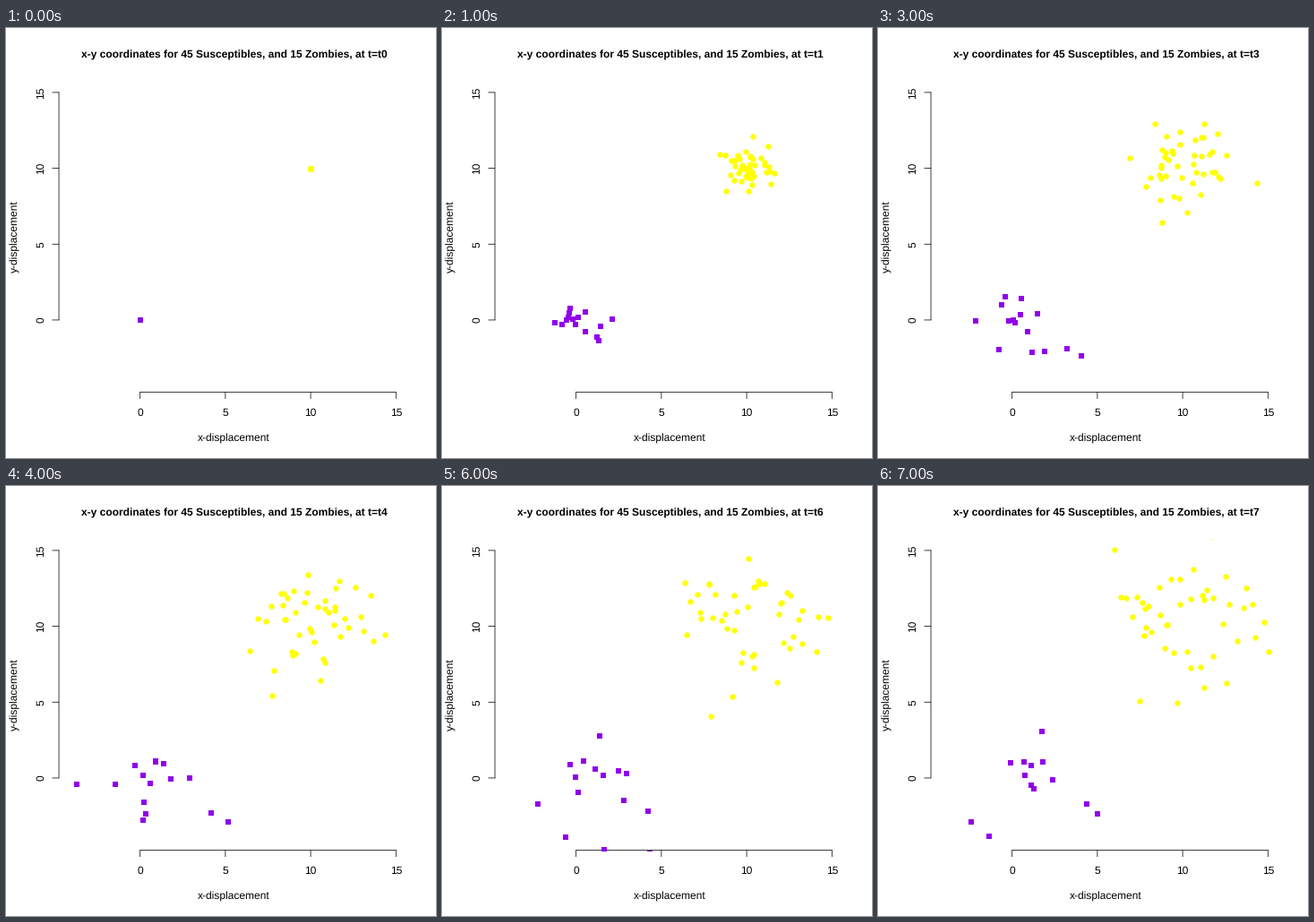
These frames come from a looping animation (480x480 px, 8000 ms). A matplotlib script:

```python
import numpy as np
import matplotlib.pyplot as plt
from matplotlib.animation import FuncAnimation
from matplotlib.patches import Rectangle

plt.rcParams["text.hinting"] = "no_hinting"

SIZE, DPI = 480, 80
PT = 72 / DPI                      # points per pixel
LEFT, RIGHT, TOP, BOTTOM = 59.04, 449.76, 59.04, 406.56
UNIT = np.array([(RIGHT - LEFT) / 20.52, (TOP - BOTTOM) / 20.52])
ORIGIN = np.array([LEFT, BOTTOM]) + 4.76 * UNIT
STEPS = 8

rng = np.random.default_rng(7)


def to_px(x, y):
    return ORIGIN + UNIT * (x, y)


def random_walk(count, start, drift, spread):
    """Gaussian walks from one start; the group's mean moves by drift."""
    moves = rng.normal(size=(STEPS, count, 2)) * spread
    moves += drift - moves.mean(axis=1, keepdims=True)
    moves[0] = start
    return ORIGIN + UNIT * moves.cumsum(axis=0)


fig = plt.figure(figsize=(SIZE / DPI, SIZE / DPI), dpi=DPI, facecolor="white")
ax = fig.add_axes([0, 0, 1, 1])
ax.set_xlim(0, SIZE)
ax.set_ylim(SIZE, 0)
ax.axis("off")


def label(x, y, text, **style):
    return ax.text(x, y, text, family="Liberation Sans", size=12 * PT,
                   ha="center", va="baseline", rotation_mode="anchor", **style)


def line(xs, ys):
    ax.plot(xs, ys, color="black", lw=0.75 * PT, solid_capstyle="round",
            snap=False)


def dots(marker, size, color):
    pts, = ax.plot([], [], ls="", marker=marker, ms=size * PT,
                   color=color, mew=0)
    pts.set_clip_path(Rectangle((LEFT, TOP), RIGHT - LEFT, BOTTOM - TOP,
                                transform=ax.transData))
    return pts


for v in (0, 5, 10, 15):
    x, y = to_px(v, v)
    line([x, x], [BOTTOM, BOTTOM + 7.2])
    line([LEFT, LEFT - 7.2], [y, y])
    label(x, 433, str(v))
    label(42, y, str(v), rotation=90)
(x0, y0), (x1, y1) = to_px(0, 0), to_px(15, 15)
line([x0, x1], [BOTTOM, BOTTOM])
line([LEFT, LEFT], [y0, y1])

mid_x, mid_y = (LEFT + RIGHT) / 2, (TOP + BOTTOM) / 2
label(mid_x, 462, "x-displacement")
label(13.7, mid_y, "y-displacement", rotation=90)
title = label(mid_x, 34, "", weight="bold")

groups = [
    (dots("o", 6.4, "#ffff00"),
     random_walk(45, (10, 10), drift=(0.04, 0.07), spread=(0.85, 0.85))),
    (dots("s", 5.6, "#9000ea"),
     random_walk(15, (0, 0), drift=(0.22, -0.15), spread=(1.0, 0.75))),
]


def draw(step):
    title.set_text("x-y coordinates for 45 Susceptibles, "
                   f"and 15 Zombies, at t=t{step}")
    for pts, path in groups:
        pts.set_data(path[step, :, 0], path[step, :, 1])
    return [title] + [pts for pts, _ in groups]


anim = FuncAnimation(fig, draw, frames=STEPS, interval=1000,
                     repeat=True, repeat_delay=0)
plt.show()
```
